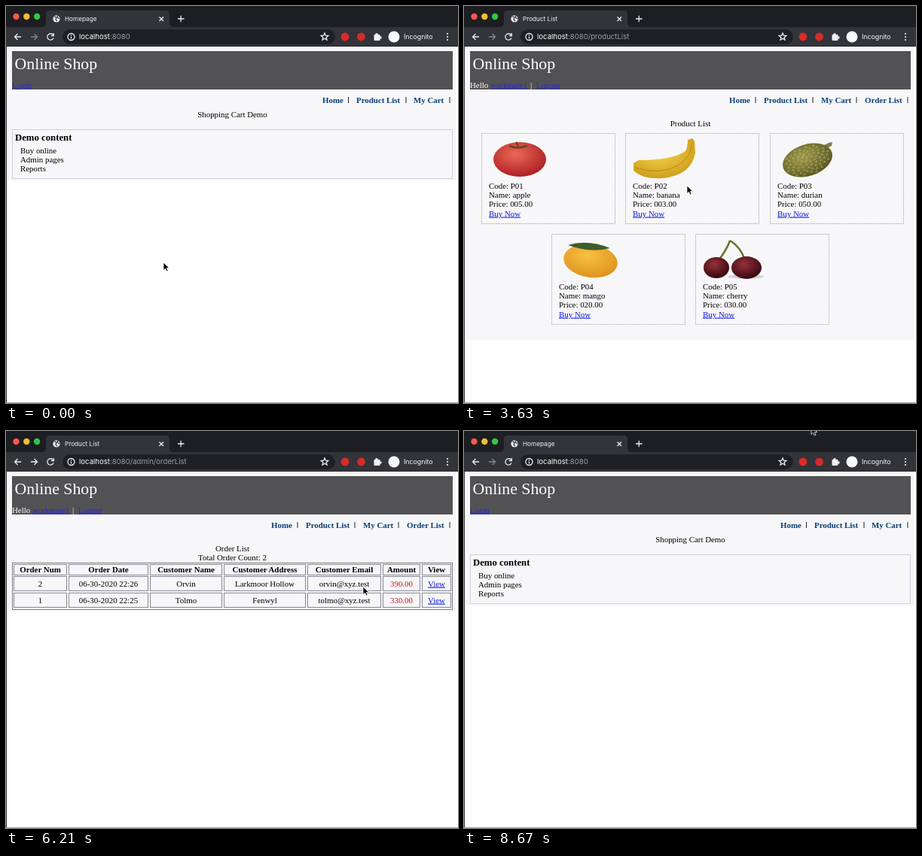
An HTML page for the animation above (8700 ms loop, 600 by 528 pixels).

```html
<!DOCTYPE html>
<html lang="en">
<head>
<meta charset="utf-8">
<title>Online Shop demo</title>
<style>
html, body { margin: 0; width: 100%; height: 100%; overflow: hidden; background: #fefefe; }
svg { display: block; }
text { font: 10.9px "Liberation Serif", "Times New Roman", serif; white-space: pre; }
.h { font-size: 12.75px; font-weight: bold; }
.b { font-weight: bold; }
.nav { font-weight: bold; fill: #0a3d75; }
.white { fill: #fff; }
.shop { font-size: 21.8px; fill: #fff; }
.link { fill: #0d18e0; text-decoration: underline; }
.dim { fill: #2a2ac0; text-decoration: underline; }
.red { fill: #cc1820; }
.total { font-size: 12.75px; font-weight: bold; fill: #dc141c; }
.form { font: 9px "Liberation Sans", Arial, sans-serif; }
.tab { font: 8.2px Inter, sans-serif; fill: #f1f3f4; }
.url { font: 9.6px Inter, sans-serif; fill: #9aa0a6; }
.inc { font: 8.8px Inter, sans-serif; fill: #f8f9fa; }
.icon { fill: none; stroke: #eceef0; stroke-width: 1.3; }
</style>
</head>
<body>
<svg width="600" height="528" viewBox="0 0 600 528">
  <defs id="defs"></defs>
  <g id="scene"></g>
  <g id="cursor">
    <path id="arrow" d="M0 0V10.5L2.5 8.3 4.2 12 6 11.2 4.4 7.6H7.6Z" fill="#000" stroke="#fff" stroke-width=".8"/>
    <path id="hand" d="M-.9 6V.6Q-.9-.5 0-.5T.9.6V4Q2.7 3.2 2.9 4.6 4.6 4 4.8 5.4 6.4 5 6.4 6.6V9Q6 11 5.2 12H-.4Q-1.2 10-3.5 7.2-3.4 5.4-.9 7.3Z" fill="#fff" stroke="#111"/>
  </g>
</svg>
<script>
const LOOP = 8700, MID = 300.5, LINE = 12.2;
const USER = 'workmate1', LEAD = 'foreman1';
const $ = id => document.getElementById(id);

const text = (x, y, s, cls = '', extra = '') => `<text x="${x}" y="${y}" class="${cls}" ${extra}>${s}</text>`;
const center = (x, y, s, cls) => text(x, y, s, cls, 'text-anchor="middle"');
const lines = (x, y, list) => list.map((s, i) => text(x, y + i * LINE, s)).join('');
const rect = (x, y, w, h, fill, extra = '') => `<rect x="${x}" y="${y}" width="${w}" height="${h}" fill="${fill}" ${extra}/>`;
const frame = (x, y, w, h, color, extra = '', fill = 'none') =>
  rect(x + .5, y + .5, w - 1, h - 1, fill, `stroke="${color}" ${extra}`);
const dot = (x, y, r, fill) => `<circle cx="${x}" cy="${y}" r="${r}" fill="${fill}"/>`;
const oval = (x, y, rx, ry, fill, turn = 0) =>
  `<ellipse rx="${rx}" ry="${ry}" fill="${fill}" transform="translate(${x} ${y}) rotate(${turn})"/>`;
const path = (d, extra = 'class="icon"') => `<path d="${d}" ${extra}/>`;
const stroke = (d, color, width = 1) => path(d, `fill="none" stroke="${color}" stroke-width="${width}"`);
const panel = (y, h) => frame(8, y, 585, h, '#cfcfde');

const star = (x, y) => 'M' + Array.from({ length: 10 }, (_, i) => {
  const a = i * Math.PI / 5, r = i % 2 ? 2.2 : 5;
  return `${x + r * Math.sin(a)} ${y - r * Math.cos(a)}`;
}).join('L') + 'Z';

function browser({ title, url, forward }, loading) {
  const [host, rest] = [url.slice(0, 9), url.slice(9)];
  const globe = dot(67, 17, 4.6, '#f1f3f4') + stroke('M64 14L67 15 66 18 68 20M69 13L68 15 71 17', '#35363a', 1.3);
  return rect(0, 0, 600, 54, '#1d1e22') +
    path('M47 28Q53 28 53 23V11Q53 6 58 6H212Q217 6 217 11V23Q217 28 223 28H600V53.5H0V28Z', 'fill="#323439"') +
    rect(75, 31, 362, 20, '#1f2024', 'rx="10"') +
    ['#f9574f', '#f8bc2f', '#35c648'].map((c, i) => dot(13.5 + i * 13.8, 14, 4.2, c)).join('') +
    (loading ? dot(67, 12, .8, '#f1f3f4') : globe) + text(78, 20, title, 'tab') +
    path('M203.5 14.5l5.5 5.5m0-5.5l-5.5 5.5M228 17h8.5m-4.3-4.3v8.6') +
    path('M20 41h-8.5m4-4l-4 4 4 4') +
    path('M33 41h8.5m-4-4l4 4-4 4', `class="icon" opacity="${forward ? 1 : .45}"`) +
    path(loading ? 'M55.5 37.5l7 7m0-7l-7 7' : 'M62.5 38.5A4.2 4.2 0 1 0 63 42.5M63.3 36v3.7h-3.6') +
    path('M91 41A4.5 4.5 0 1 1 82 41 4.5 4.5 0 1 1 91 41M86.5 40.5v3m0-5.2v1.1') +
    text(97, 44.3, `<tspan class="white">${host}</tspan>${rest}`, 'url') + path(star(423, 41)) +
    dot(450, 41, 5.4, '#de2a26') + dot(471.5, 41, 5.4, '#d22c2a') +
    rect(488.5, 38, 8, 8, '#f1f3f4', 'rx="1"') + dot(492, 37.8, 1.8, '#f1f3f4') + dot(497, 42, 1.8, '#f1f3f4') +
    dot(515, 41, 7.5, '#f8f9fa') + text(528, 44.2, 'Incognito', 'inc') +
    [37, 41, 45].map(y => dot(586, y, 1.1, '#f1f3f4')).join('');
}

function header(loggedIn) {
  const nav = loggedIn
    ? [[352, 'Home', 387], [398, 'Product List', 463], [474, 'My Cart', 521], [532, 'Order List', 589]]
    : [[420, 'Home', 454.5], [465, 'Product List', 531], [541, 'My Cart', 589]];
  return rect(8, 60, 585, 51, '#525254') + text(11.5, 83.8, 'Online Shop', 'shop') +
    (loggedIn
      ? text(8, 108.5, 'Hello', 'white') + text(35, 108.5, USER, 'dim') +
        text(88, 108.5, '|', 'white') + text(96, 108.5, 'Logout', 'dim')
      : text(8, 108.5, 'Login', 'dim')) +
    nav.map(([x, s, bar]) => text(x, 128.5, s, 'nav') + rect(bar - .5, 121, 1, 8, '#222')).join('');
}

function table(y, edges, rows) {
  const rowTop = r => r ? Math.round(y + 18 + 21.5 * (r - 1)) : y + 2;
  return frame(8, y, 585, rowTop(rows.length) - y + 2, '#7c7c88') + rows.map((row, r) => row.map((s, c) => {
    const x = edges[c] + 1, w = edges[c + 1] - edges[c] - 2;
    const cls = !r ? 'b' : s === 'View' ? 'link' : rows[0][c] === 'Amount' && row.includes('View') ? 'red' : '';
    return frame(x, rowTop(r), w, r ? 20 : 15, '#888894') + center(x + w / 2, rowTop(r) + (r ? 13.6 : 10.8), s, cls);
  }).join('')).join('');
}

const home = () => center(MID, 147.5, 'Shopping Cart Demo') + panel(164, 66) +
  text(12, 179.2, 'Demo content', 'h') + lines(19, 195.5, ['Buy online', 'Admin pages', 'Reports']);

function login(t) {
  const typed = (s, from) => s.slice(0, Math.max(0, Math.floor((t - from) / 32)));
  const field = (y, s) => frame(83, y, 104, 15, '#777780', 'rx="1"', '#fff') + text(86, y + 10.8, s, 'form');
  const button = (x, w, s, down) => frame(x, 281, w, 14, down ? '#222' : '#777780', 'rx="2"', down ? '#d6d6da' : '#efeff1') +
    center(x + w / 2, 291.2, s, 'form');
  return center(MID, 159.7, 'Login (For Employee, Manager)') + panel(188, 116) +
    text(12, 203.5, 'Enter username and password', 'h') +
    text(17, 246.7, 'User Name *') + text(17, 269.2, 'Password *') +
    field(236, typed(USER, 1100)) + field(258, typed('•'.repeat(7), 1700)) +
    button(83, 33, 'Login', t > 2350) + button(119, 34, 'Reset') +
    text(8, 329.3, 'User/Password:', 'h') + lines(15, 345.7, [USER + '/pwd_emp', LEAD + '/pwd_mng']);
}

// Each fruit: name, price, light and dark tone, drawing
const spikes = Array.from({ length: 70 }, (_, i) => {
  const a = i * 2.4, r = Math.sqrt(i / 70);
  return `M${(31 * r * Math.cos(a) - 2).toFixed(1)} ${(19 * r * Math.sin(a) + 1).toFixed(1)}l1.5-2 1.5 2`;
}).join('');
const fruits = [
  ['apple', '005.00', '#ea6a58', '#b02024', fill => oval(51, 35, 35, 23, fill) +
    stroke('M37 17Q48 22 61 17M49 20Q49 15 46 12', '#5c4420', 2)],
  ['banana', '003.00', '#f6d34c', '#cf9f1c', fill =>
    path('M83 9L89 7 92 11 93 26Q88 56 50 60 24 62 11 50L11 40 18 36Q62 36 80 24 83 18 83 9Z', `fill="${fill}"`) +
    stroke('M13 46Q47 57 72 42 88 30 88 15', '#b58a1c')],
  ['durian', '050.00', '#a09a4c', '#5c5a24', fill => path('M66 19L78 13 83 12 82 17 69 24Z', 'fill="#857c48"') +
    oval(50, 36, 34, 21, fill, -18) + `<g transform="translate(50 36) rotate(-18)">${stroke(spikes, '#c4bc74', .7)}</g>`],
  ['mango', '020.00', '#f8c244', '#df9420', fill => oval(52, 36, 36, 22, fill, 8) +
    path('M22 15Q48 7 78 19 52 26 22 15Z', 'fill="#3f5c28"')],
  ['cherry', '030.00', '#96303a', '#380810', fill => oval(67, 57, 24, 3, '#d4d4dc') +
    stroke('M29 38Q42 21 46 9M66 35Q60 17 46 9', '#68732c', 2.5) + oval(28, 45, 17, 14, fill) + oval(68, 45, 20, 15, fill)],
];
$('defs').innerHTML = fruits.map(([name, , light, dark]) =>
  `<radialGradient id="${name}" cx=".42" cy=".35" r=".65"><stop stop-color="${light}"/><stop offset="1" stop-color="${dark}"/></radialGradient>`).join('');

const products = () => center(MID, 159.7, 'Product List') + fruits.map(([name, price, , , art], i) => {
  const row = Math.floor(i / 3), x = Math.round(22.6 + 191.7 * (i % 3)) + row * 93, y = 169 + 134 * row;
  return `<g transform="translate(${x} ${y})">` + frame(0, 0, 178, 121, '#b4b4c4', 'stroke-dasharray="2 1"') + art(`url(#${name})`) +
    lines(10, 74, [`Code: P0${i + 1}`, 'Name: ' + name, 'Price: ' + price]) + text(10, 110.6, 'Buy Now', 'link') + '</g>';
}).join('');

// Cart items are [product index, quantity]
const orders = [
  { num: 2, date: '06-30-2020 22:26', name: 'Orvin', place: 'Larkmoor Hollow', cart: [[2, 1], [3, 2], [4, 10]] },
  { num: 1, date: '06-30-2020 22:25', name: 'Tolmo', place: 'Fenwyl', cart: [[1, 10], [4, 10]] },
];
const money = n => n.toFixed(2).padStart(6, '0');
const mail = o => o.name.toLowerCase() + '@xyz.test';
const total = o => money(o.cart.reduce((sum, [i, n]) => sum + fruits[i][1] * n, 0));

const orderList = () => center(MID, 159.7, 'Order List') + center(MID, 171.8, 'Total Order Count: 2') +
  table(175, [9, 82, 190, 288, 399, 499, 551, 592], [
    ['Order Num', 'Order Date', 'Customer Name', 'Customer Address', 'Customer Email', 'Amount', 'View'],
    ...orders.map(o => [o.num, o.date, o.name, o.place, mail(o), total(o), 'View'])]);

const orderInfo = o => center(MID, 159.7, 'Order Info') + panel(162, 109) +
  text(12, 174.6, 'Customer Information:', 'h') +
  lines(19, 190.7, ['Name: ' + o.name, 'Email: ' + mail(o), 'Phone: 2005550147', 'Address: ' + o.place]) +
  text(12, 245, 'Order Summary:', 'h') + text(19, 263.3, 'Total:') + text(47, 263.3, total(o), 'total') +
  table(283, [9, 159, 313, 414, 498, 592], [['Product Code', 'Product Name', 'Quantity', 'Price', 'Amount'],
    ...o.cart.map(([i, n]) => [`P0${i + 1}`, fruits[i][0], n, fruits[i][1], money(fruits[i][1] * n)])]);

const page = (title, url, height, loggedIn, body, forward) =>
  ({ title, url: 'localhost:8080' + url, height, loggedIn, body, forward });
const homePage = page('Homepage', '', 232, false, home);
const loginPage = page('Login', '/admin/login', 361, false, login);
const productPage = page('Product List', '/productList', 444, true, products);
const listPage = forward => page('Product List', '/admin/orderList', 239, true, orderList, forward);
const orderPage = i =>
  page('Product List', '/admin/order?orderId=cf517d1c-5661-41ea-a0a7-2...', 380, true, () => orderInfo(orders[i]));

// Pointer stops: arrival time, x, y, then what is clicked there and the page it opens
const MOVE = 360, CLICK = 100, SUBMIT = 300;
const stops = [
  [0, 209, 341],
  [650, 20, 104, 'link', loginPage],
  [1050, 120, 243],
  [1700, 120, 265],
  [2300, 99, 288, 'submit', productPage],
  [3600, 296, 239],
  [4250, 556, 124, 'link', listPage(false)],
  [5030, 576, 205, 'link', orderPage(0)],
  [5720, 15, 40, 'back', listPage(true)],
  [6200, 474, 207],
  [6590, 571, 224, 'link', orderPage(1)],
  [7050, 15, 40, 'back', listPage(true)],
  [7540, 437, 229],
  [8000, 111, 104, 'link', homePage],
  [8670, 461, -6],
];
const opens = ([time, , , kind]) => time + CLICK + (kind === 'submit' ? SUBMIT : 0);

let shown = '';

function draw(now) {
  const t = now % LOOP;
  const opened = stops.findLast(s => s[4] && opens(s) <= t);
  const p = opened ? opened[4] : homePage;
  const loading = stops.some(s => s[3] === 'submit' && t >= s[0] + CLICK && t < opens(s));
  const markup = rect(0, 0, 600, 528, '#fefefe') + rect(3, 53, 595, p.height - 53, '#f7f7f9') +
    browser(p, loading) + header(p.loggedIn) + p.body(t) +
    rect(0, 53, 1, 475, '#35363a') + rect(0, 527, 600, 1, '#a6a6aa');
  if (markup !== shown) $('scene').innerHTML = shown = markup;

  const i = stops.findLastIndex(s => s[0] - MOVE <= t);
  const to = stops[i], from = stops[i - 1] || to;
  const u = Math.min(1, (t - to[0] + MOVE) / MOVE), ease = u * u * (3 - 2 * u);
  const at = k => (from[k] + (to[k] - from[k]) * ease).toFixed(1);
  $('cursor').setAttribute('transform', `translate(${at(1)} ${at(2)})`);
  const hand = to[3] === 'link' && u > .9;
  $('hand').style.display = hand ? '' : 'none';
  $('arrow').style.display = hand ? 'none' : '';
}

const start = performance.now();
function tick() {
  draw(performance.now() - start);
  requestAnimationFrame(tick);
}
tick();
</script>
</body>
</html>
```
